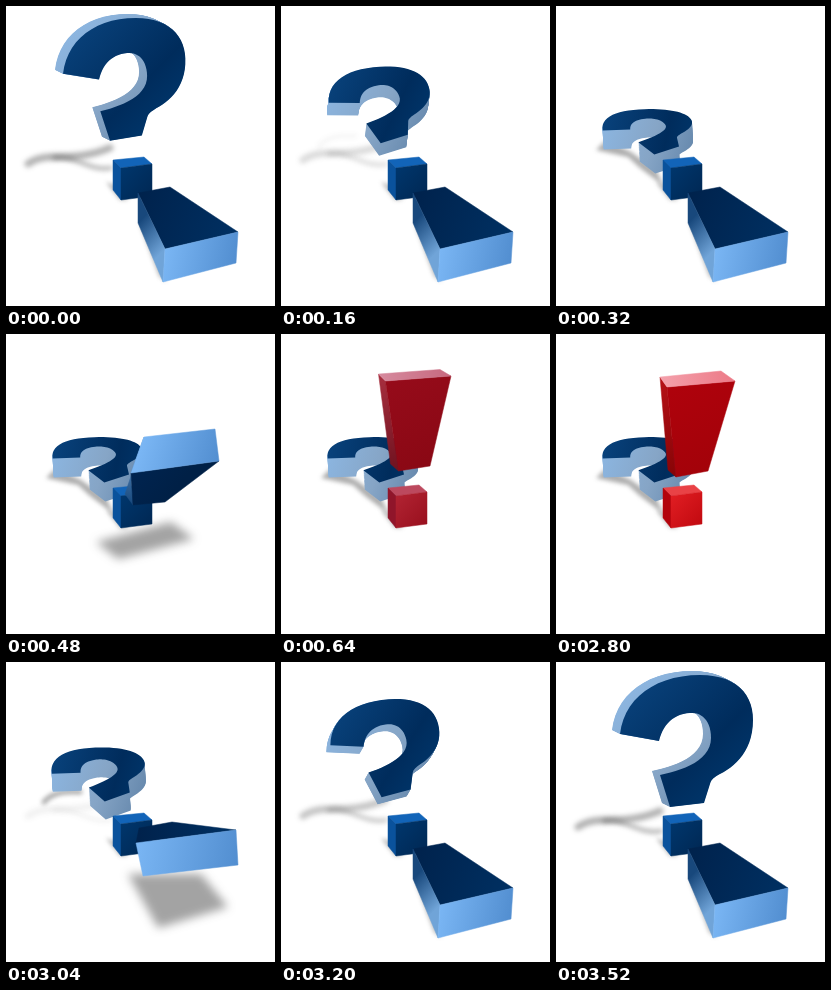
Animation of 269 by 300 pixels, one loop 5.72 s. Source, as an HTML page with a canvas:

```html
<!DOCTYPE html>
<html lang="en">
<head>
<meta charset="utf-8">
<title>Question and exclamation</title>
<style>
  html, body { margin: 0; width: 100%; height: 100%; overflow: hidden; background: #fff; }
  canvas { display: block; width: 100%; height: 100%; }
</style>
</head>
<body>
<canvas id="stage" width="269" height="300"></canvas>
<script>
const ctx = document.getElementById('stage').getContext('2d');
const LOOP = 5720, STEP = 80;

// time, bar raised (0 lying, 1 upright), question raised, redness
const timeline = [
  [0, 0, .87, 0], [80, 0, .64, 0], [160, 0, .38, 0], [240, 0, .14, 0], [320, 0, 0, 0],
  [400, .24, 0, 0], [480, .5, 0, 0], [560, .76, 0, .3], [640, .94, 0, .75],
  [720, .98, 0, .93], [800, 1, 0, 1], [2720, 1, 0, 1],
  [2800, .88, 0, .95], [2880, .7, 0, .6], [2960, .46, 0, .15], [3040, .25, .2, 0],
  [3120, .08, .36, 0], [3200, 0, .55, 0], [3280, 0, .72, 0], [3360, 0, .87, 0],
  [3440, 0, .95, 0], [3520, 0, 1, 0]
];

// Wide end (front-left, front-right, back-right, back-left), then narrow end
const barPoses = [
  [0, 157,276, 230,257, 232,226, 159,243, 132,217, 163,210, 164,181, 132,187],
  [.25, 137,214, 232,203, 230,168, 130,181, 132,192, 165,185, 166,160, 133,166],
  [.5, 125,139, 213,127, 209,95, 138,103, 127,171, 159,168, 151,158, 119,160],
  [.88, 111,53, 179,47, 165,37, 104,43, 120,143, 152,137, 143,130, 112,136],
  [1, 98,41, 161,37, 153,34, 91,37, 115,131, 146,127, 138,120, 107,124]
];

// Face corners clockwise from top left, extrusion offset, foreshortening
const markPoses = [
  [0, 39,105, 121,102, 162,133, 60,158, 1,19, 1.4],
  [.2, 37,88, 124,84, 163,122, 60,150, 1,18, 1.3],
  [.55, 44,42, 150,34, 173,124, 57,142, -4,7, 1.15],
  [.87, 57,12, 178,12, 182,131, 57,137, -8,-4, 1],
  [1, 64,13, 197,13, 197,145, 64,145, -8,-4, 1]
];

const barShadows = [
  [.25, 122,212, 195,212, 222,245, 152,266],
  [.5, 90,208, 165,188, 188,205, 112,225]
];

const lerp = (a, b, k) => a + (b - a) * k;
const mix = (a, b, k) => a.map((n, i) => lerp(n, b[i], k));
const clamp = n => Math.max(0, Math.min(1, n));
const rgb = c => `rgb(${c.map(Math.round)})`;
const pairs = list => list.reduce((out, n, i) =>
  (i % 2 ? out[out.length - 1].push(n) : out.push([n]), out), []);

function sample(table, at) {
  let i = table.findIndex(row => row[0] >= at);
  if (i < 0) return table[table.length - 1].slice(1);
  if (i === 0) return table[0].slice(1);
  const a = table[i - 1], b = table[i];
  return mix(a, b, (at - a[0]) / (b[0] - a[0])).slice(1);
}

function trace(points) {
  ctx.beginPath();
  points.forEach(([x, y]) => ctx.lineTo(x, y));
  ctx.closePath();
}

// Fills a face only when it turns towards the viewer
function face(points, from, to = from) {
  const area = points.reduce((sum, [x, y], i) => {
    const [nx, ny] = points[(i + 1) % points.length];
    return sum + x * ny - nx * y;
  }, 0);
  if (area <= 0) return;
  const fill = ctx.createLinearGradient(...points[0], ...points[2]);
  fill.addColorStop(0, rgb(from));
  fill.addColorStop(1, rgb(to));
  trace(points);
  ctx.fillStyle = fill;
  ctx.strokeStyle = fill;
  ctx.lineWidth = .5;
  ctx.fill();
  ctx.stroke();
}

// Question mark outline in a unit square: corners and cubic curves
const outline = (() => {
  const points = [];
  let pen;
  const line = (x, y) => points.push(pen = [x, y]);
  const curve = (...c) => {
    const p = [pen, ...pairs(c)];
    for (let i = 1; i <= 14; i++) {
      const t = i / 14, s = 1 - t;
      pen = [0, 1].map(k => s ** 3 * p[0][k] + 3 * s * s * t * p[1][k]
        + 3 * s * t * t * p[2][k] + t ** 3 * p[3][k]);
      points.push(pen);
    }
  };
  line(64, 72);
  curve(68, 36, 100, 13, 144, 13);
  curve(180, 13, 197, 32, 197, 58);
  curve(197, 88, 180, 104, 164, 112);
  curve(157, 116, 155, 118, 154, 122);
  line(148, 141);
  line(114, 145);
  line(104, 113);
  curve(128, 108, 155, 98, 155, 76);
  curve(155, 58, 145, 50, 134, 51);
  curve(118, 52, 107, 62, 103, 79);
  return points.map(([x, y]) => [(x - 64) / 133, (y - 13) / 132]);
})();

function drawMark(raised) {
  const pose = sample(markPoses, raised);
  const [tl, tr, br, bl, [dx, dy]] = pairs(pose.slice(0, 10));
  const depth = pose[10];
  const points = outline.map(([u, v]) => {
    const w = v / (v + depth * (1 - v));
    return mix(mix(tl, tr, u), mix(bl, br, u), w);
  });
  const side = ctx.createLinearGradient(tl[0], tl[1], br[0], br[1] + 10);
  side.addColorStop(0, '#8db9e6');
  side.addColorStop(.5, '#86a5c6');
  side.addColorStop(1, '#55799f');
  ctx.fillStyle = side;
  const layers = 24;
  for (let i = layers; i > 0; i--) {
    trace(points.map(([x, y]) => [x + dx * i / layers, y + dy * i / layers]));
    ctx.fill();
  }
  const front = ctx.createLinearGradient(...tl, ...br);
  front.addColorStop(0, '#0a4580');
  front.addColorStop(.6, '#002c5c');
  front.addColorStop(1, '#003c74');
  trace(points);
  ctx.fillStyle = front;
  ctx.fill();
}

function drawCube(red) {
  const tone = (a, b) => mix(a, b, red);
  face([[107,154], [138,151], [146,158], [115,162]], tone([18,100,184], [244,64,64]));
  face([[107,154], [115,162], [115,194], [107,184]], tone([10,82,156], [188,0,4]));
  face([[115,162], [146,158], [146,190], [115,194]],
    tone([0,54,108], [236,28,30]), tone([0,40,84], [204,8,12]));
}

function drawBar(raised, red) {
  const [A, B, C, D, a, b, c, d] = pairs(sample(barPoses, raised));
  const tone = (p, q) => mix(p, q, red);
  const pale = clamp((1 - raised) / .12);
  face([d, c, C, D], [0,34,76], [0,48,98]);
  face([B, C, c, b], tone([30,86,146], [150,0,0]));
  face([D, A, a, d], tone([112,164,216], [186,8,12]), tone([24,72,124], [140,0,0]));
  face([A, B, b, a], tone([0,36,80], mix([216,4,8], [184,0,8], pale)),
    tone([0,32,70], mix([196,0,0], [172,0,6], pale)));
  face([D, C, B, A], tone([122,182,244], mix([240,86,90], [250,160,168], pale)),
    tone([82,142,208], mix([232,64,70], [244,120,130], pale)));
}

function blurred(radius, alpha, draw) {
  if (alpha <= 0) return;
  ctx.save();
  ctx.filter = `blur(${radius}px)`;
  ctx.globalAlpha = alpha;
  ctx.fillStyle = ctx.strokeStyle = '#333';
  ctx.lineCap = 'round';
  draw();
  ctx.restore();
}

function drawShadows(bar, mark) {
  const high = clamp((mark - .1) / .6);
  blurred(2.5, .38 * high, () => {
    const y = lerp(-8, 3, clamp((mark - .8) / .2));
    ctx.translate(0, y);
    ctx.lineWidth = 7;
    ctx.beginPath();
    ctx.moveTo(22, 162);
    ctx.bezierCurveTo(42, 148, 66, 162, 104, 146);
    ctx.stroke();
    ctx.lineWidth = 4;
    ctx.beginPath();
    ctx.moveTo(48, 156);
    ctx.bezierCurveTo(72, 154, 84, 170, 105, 166);
    ctx.stroke();
  });
  blurred(2, .4 * clamp(1 - Math.abs(mark - .2) / .2), () => {
    ctx.lineWidth = 5;
    ctx.beginPath();
    ctx.moveTo(38, 140);
    ctx.quadraticCurveTo(48, 128, 74, 130);
    ctx.stroke();
  });
  blurred(2, .4 * clamp(1 - mark * 5), () => {
    trace([[40,144], [50,134], [75,146], [100,164], [108,180], [84,162], [72,151]]);
    ctx.fill();
  });
  const cast = bar < .5 ? clamp(bar / .2) : clamp((.88 - bar) / .38);
  blurred(5, .45 * cast, () => {
    trace(pairs(sample(barShadows, bar)));
    ctx.fill();
  });
  blurred(2, .35 * clamp(1 - bar * 5), () => {
    trace([[133,216], [153,270], [160,276], [146,230]]);
    ctx.fill();
  });
  blurred(2, .35, () => {
    trace([[100,176], [112,180], [122,194], [114,194]]);
    ctx.fill();
  });
}

function render(now) {
  const time = Math.floor((now % LOOP) / STEP) * STEP;
  const [bar, mark, red] = sample(timeline, time);
  ctx.fillStyle = '#fff';
  ctx.fillRect(0, 0, 269, 300);
  drawShadows(bar, mark);
  drawMark(mark);
  drawCube(red);
  drawBar(bar, red);
}

const start = performance.now();
function tick() {
  render(performance.now() - start);
  requestAnimationFrame(tick);
}
tick();
</script>
</body>
</html>
```
